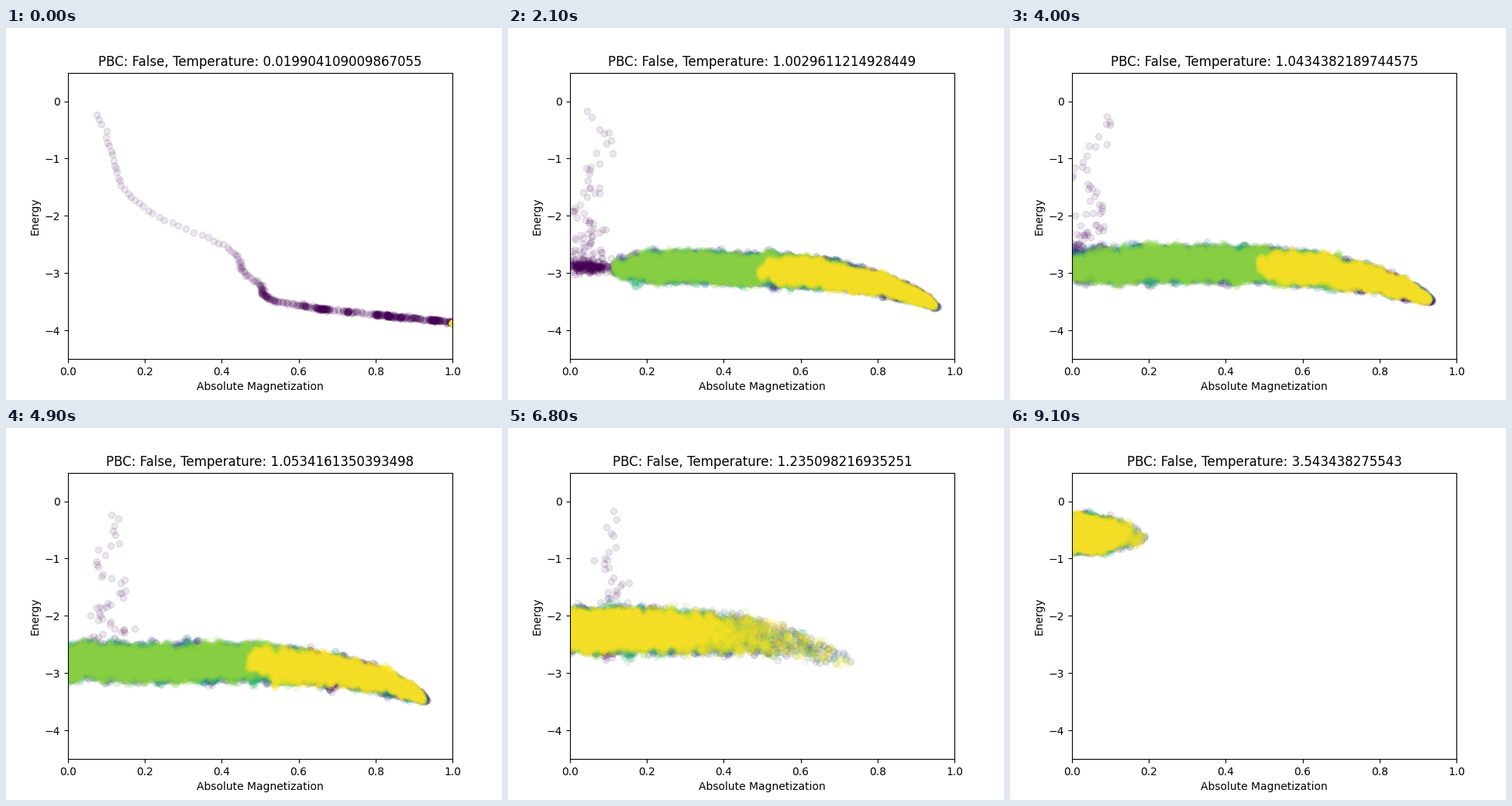
Write a matplotlib script that moves like this. It is 640 px wide and 480 px high and loops after 9200 ms.

```python
import numpy as np
import matplotlib.pyplot as plt
from matplotlib.animation import FuncAnimation

FRAMES, INTERVAL = 92, 100
LEVELS = 8
ORDERED, DISORDERED = 0.98, 1.12  # borders of the critical regime

# Temperature schedule: slow around the critical point, fast elsewhere.
STEPS = [0, 8, 21, 40, 59, 77, 91]
TEMPS = [0.019904109009867055, 0.6580595655884287, 1.0029611214928449,
         1.0434382189744575, 1.068632515543, 1.6135188499699238,
         3.543438275543]

# Equilibrium cloud: temperature, energy at zero magnetization,
# energy and magnetization of the tip, half thickness.
CLOUD = np.array([(0.02, -3.05, -3.87, 1.00, 0.05),
                  (0.66, -3.05, -3.87, 1.00, 0.23),
                  (1.00, -2.90, -3.60, 0.96, 0.29),
                  (1.04, -2.86, -3.49, 0.94, 0.33),
                  (1.07, -2.72, -3.46, 0.93, 0.37),
                  (1.61, -1.41, -1.58, 0.36, 0.43),
                  (3.54, -0.56, -0.62, 0.19, 0.34)])


def monotone_slopes():
    rate = np.diff(TEMPS) / np.diff(STEPS)
    inner = 2 * rate[1:] * rate[:-1] / (rate[1:] + rate[:-1])
    return [rate[0], *inner, 1.4 * rate[-1]]


SLOPES = monotone_slopes()


def temperature(frame):
    """Monotone cubic through the schedule."""
    k = min(np.searchsorted(STEPS, frame, side="right"), len(STEPS) - 1) - 1
    width = STEPS[k + 1] - STEPS[k]
    t = (frame - STEPS[k]) / width
    rise = t * t * (3 - 2 * t)
    bend = width * t * (1 - t) * ((1 - t) * SLOPES[k] - t * SLOPES[k + 1])
    return float((1 - rise) * TEMPS[k] + rise * TEMPS[k + 1] + bend)


def smooth_noise(rng, n, length):
    kernel = np.hanning(length + 2)
    kernel /= np.linalg.norm(kernel)
    return np.convolve(rng.normal(size=n + length + 1), kernel, "valid")


class Run:
    """Samples of one Monte Carlo run at a fixed temperature."""

    def __init__(self, frame, temp):
        self.rng = np.random.default_rng(700 + frame)
        self.temp = temp
        self.e0, self.e_tip, self.m_tip, self.half = (
            np.interp(np.log(temp), np.log(CLOUD[:, 0]), column)
            for column in CLOUD[:, 1:].T)
        self.m_low = 1 - 0.53 * temp ** 5.4 if temp < ORDERED else 0

    def energies(self, m, fill=1):
        """Scatter inside the banana-shaped cloud, with a ragged rim."""
        bend = np.interp(self.temp, [1.07, 1.6], [5, 2])
        taper = np.interp(self.temp, [1.07, 1.6], [4, 2])
        u = np.clip(m / self.m_tip, 0, 1)
        spread = 1.05 * fill * np.tanh(0.52 * self.rng.normal(size=len(m)))
        bumps = smooth_noise(self.rng, 120, 3)
        ragged = 0.13 * np.interp(m, np.linspace(0, 1, 120), bumps)
        centre = self.e0 + (self.e_tip - self.e0) * u ** bend
        return centre + self.half * np.sqrt(1 - u ** taper) * (spread + ragged)

    def quench(self):
        """Relaxation from disorder, then coarsening in the ordered phase."""
        rng, temp = self.rng, self.temp
        tau = 25 * (abs(self.e0) / 2.9) ** 1.5
        ordered = temp < ORDERED
        n = int(500 + 3000 * temp ** 2 if ordered else 12 * tau)
        pace = np.cumsum(np.exp(smooth_noise(rng, n, 25)))
        m = self.m_low * (pace / pace[-1]) ** (0.45 + 0.55 * temp)
        wander = min(0.004 + 0.05 * temp, 0.035) * smooth_noise(rng, n, 14)
        jitter = min(0.012 + 0.05 * temp, 0.05)
        m = m + (1 - m) * (0.05 + wander) + 0.2 * jitter * rng.normal(size=n)
        m = np.abs(np.minimum(m, 1))
        floor = -2.95 - 0.9 * m ** 0.7 if ordered else self.e0
        e = floor + (-0.2 - floor) * np.exp(-np.arange(n) / tau)
        return m, e + jitter * rng.normal(size=n)

    def band(self, progress):
        """Samples of one stretch of time once the energy has settled."""
        rng = self.rng
        if self.temp > DISORDERED:
            n = int((5000 if progress == 1 else 1300) * (0.6 + self.m_tip))
            m = np.abs(rng.normal(0, self.m_tip / 3.1, n))
            m = m[m < self.m_tip]
            return m, self.energies(m)
        if self.temp < ORDERED:
            low, high = self.m_low, self.m_tip
            n = int(50 + 7000 * (high - low))
        else:
            # The magnetization sweeps back and forth over the cloud.
            swing = np.cos(4 * np.pi * (1 - progress))
            middle = 0.46 + 0.28 * swing + rng.normal(0, 0.04)
            reach = 0.33 - 0.08 * swing
            low = max(middle - reach, 0.13 - 6 * (self.temp - 1), -0.12)
            high = min(middle + reach, self.m_tip - 0.01 * progress)
            n = int((10000 if progress > 0.8 else 4500) * (high - low))
        t = rng.beta(1.4, 1.3, n)
        fill = np.clip(0.4 + 4 * t, 0, 1)
        m = np.abs(low + (high - low) * t)
        return m, self.energies(m, fill)


fig, ax = plt.subplots(figsize=(6.4, 4.8), dpi=100)
ax.set(xlim=(0, 1), ylim=(-4.5, 0.5),
       xlabel="Absolute Magnetization", ylabel="Energy")
title = ax.set_title("")
progresses = np.linspace(0, 1, LEVELS - 1)
trail, *layers = [
    ax.plot([], [], "o", ms=6, mew=1, alpha=0.1, color=plt.cm.viridis(p)[:3])[0]
    for p in [0.0, *progresses]]


def draw(frame):
    temp = temperature(frame)
    run = Run(frame, temp)
    title.set_text(f"PBC: False, Temperature: {temp}")
    trail.set_data(*run.quench())
    for layer, progress in zip(layers, progresses):
        layer.set_data(*run.band(progress))
    return [title, trail, *layers]


anim = FuncAnimation(fig, draw, frames=FRAMES, interval=INTERVAL,
                     repeat=True, repeat_delay=0, blit=False)
plt.show()
```
